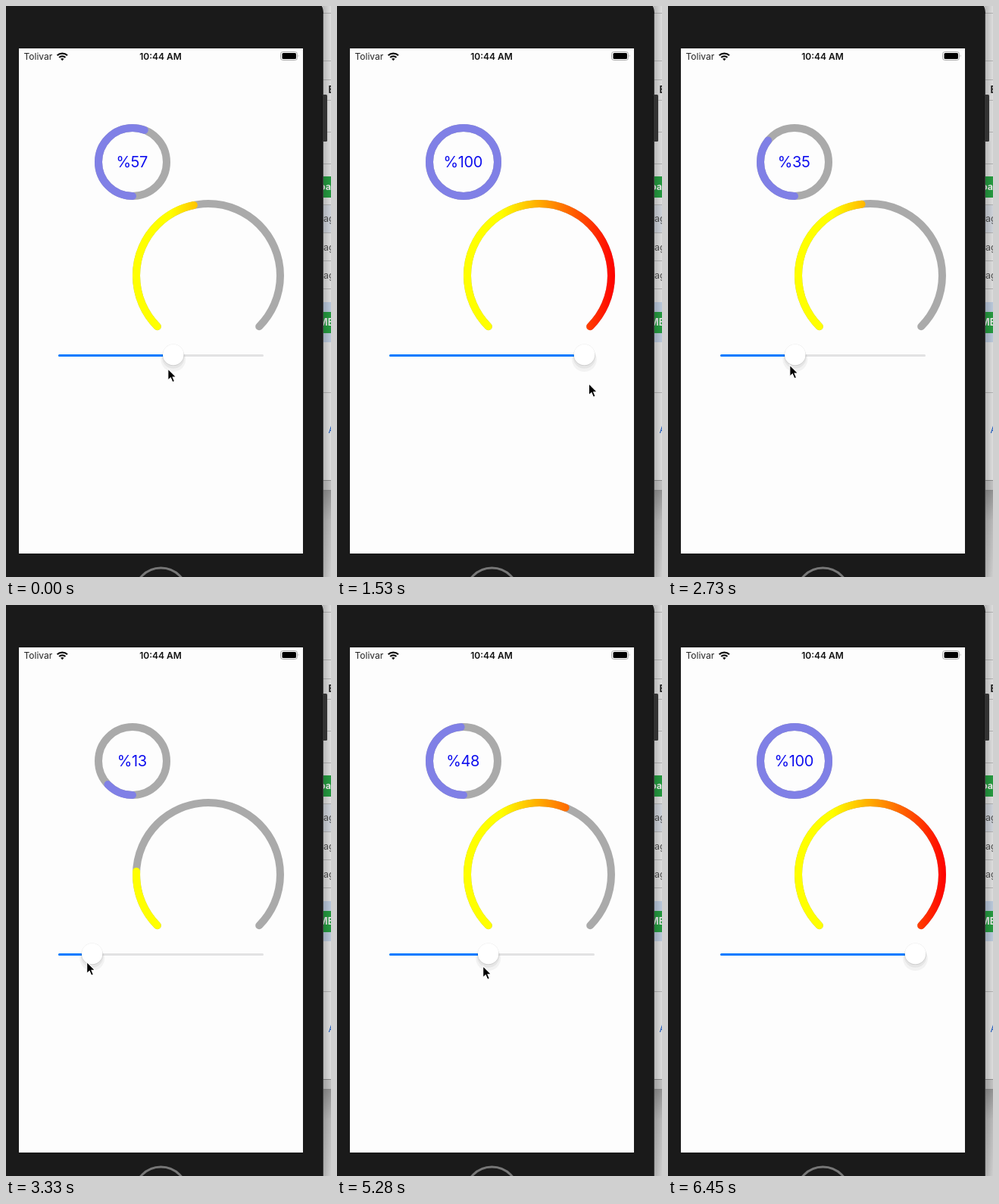
Recreate the animation shown at these times as an HTML page. Size 429 by 754 pixels, loop 6.9 s.

```html
<!DOCTYPE html>
<html lang="en">
<head>
<meta charset="utf-8">
<title>Progress rings</title>
<style>
  html, body { margin: 0; width: 100%; height: 100%; overflow: hidden; background: #1a1a1a; }
  svg { display: block; width: 429px; height: 754px; }
  text { font-family: Inter, Roboto, "Liberation Sans", sans-serif; }
  .ring { fill: none; stroke-width: 10; stroke-linecap: round; }
</style>
</head>
<body>
<svg viewBox="0 0 429 754">
  <defs>
    <linearGradient id="heat" gradientUnits="userSpaceOnUse" x1="217" x2="367" y1="0" y2="0">
      <stop stop-color="#ff0"/>
      <stop offset="1" stop-color="#f00"/>
    </linearGradient>
    <linearGradient id="edge">
      <stop offset="0" stop-color="#000" stop-opacity=".24"/>
      <stop offset="1" stop-color="#000" stop-opacity=".08"/>
    </linearGradient>
    <linearGradient id="floor" x2="0" y2="1">
      <stop offset="0" stop-color="#a0a0a0"/>
      <stop offset=".35" stop-color="#cacaca"/>
      <stop offset="1" stop-color="#e0e0e0"/>
    </linearGradient>
  </defs>

  <!-- window behind the device -->
  <rect x="416" width="13" height="754" fill="#f0f0f0"/>
  <rect x="416" y="262" width="13" height="37" fill="#dfe4ec"/>
  <rect x="416" y="391" width="13" height="53" fill="#c9d9ed"/>
  <g id="rules" stroke="#c2c2c2"></g>
  <g fill="#28a745">
    <rect x="412" y="225" width="20" height="28"/>
    <rect x="412" y="404" width="20" height="28"/>
  </g>
  <g font-size="12.5" fill="#555">
    <text x="425.5" y="115" font-weight="700" fill="#222">E</text>
    <text x="414" y="243" font-weight="700" fill="#fff">oa</text>
    <text x="419" y="285">ag</text>
    <text x="419" y="323">ag</text>
    <text x="419" y="360">ag</text>
    <text x="413" y="422" font-weight="700" fill="#fff">ME</text>
    <text x="425.5" y="564" fill="#1a5fd0">A</text>
  </g>
  <rect x="416" y="626" width="13" height="14" fill="#d2d2d2"/>
  <path d="M416 626.5h13M416 639.5h13" stroke="#999"/>
  <rect x="416" y="640" width="13" height="114" fill="url(#floor)"/>
  <rect x="418" width="11" height="754" fill="url(#edge)"/>

  <!-- device -->
  <path d="M0 0H417Q419 4 419 12V754H0Z" fill="#1a1a1a"/>
  <path d="M418.5 10V754" stroke="#3c3c3c"/>
  <rect x="417" y="117" width="7" height="62" rx="1.5" fill="#333"/>
  <path d="M417.5 118V178" stroke="#111"/>
  <circle cx="204.5" cy="777" r="35" fill="none" stroke="#777" stroke-width="3"/>
  <rect x="17" y="56" width="375" height="667" fill="#fdfdfd"/>

  <!-- status bar -->
  <text x="23.5" y="71" font-size="12" fill="#222">Tolivar</text>
  <text x="204" y="71" font-size="12" font-weight="600" text-anchor="middle" fill="#111">10:44 AM</text>
  <g fill="none" stroke="#111" stroke-width="2.2">
    <path d="M67.6 65.3A9.5 9.5 0 0 1 81 65.3"/>
    <path d="M70.2 68A5.8 5.8 0 0 1 78.4 68"/>
  </g>
  <path d="M72 69.8Q74.3 68 76.6 69.8L74.3 72.2Z" fill="#111"/>
  <rect x="362.5" y="60.5" width="22" height="11" rx="3" fill="none" stroke="#aaa"/>
  <rect x="364.5" y="62" width="18.5" height="8" rx="1.6" fill="#000"/>
  <path d="M385.8 64Q387.4 65.7 385.8 67.5Z" fill="#aaa"/>

  <!-- rings -->
  <circle cx="167" cy="206" r="45" class="ring" stroke="#aaa"/>
  <path id="small" d="M167 251A45 45 0 0 1 167 161A45 45 0 0 1 167 251" pathLength="100" class="ring" stroke="#8080e6"/>
  <text id="label" x="166.2" y="213" font-size="20" letter-spacing="-.4" text-anchor="middle" fill="#0f0fee"></text>
  <path d="M199.8 423.2A95 95 0 1 1 334.2 423.2" class="ring" stroke="#aaa"/>
  <path id="big" d="M199.8 423.2A95 95 0 1 1 334.2 423.2" pathLength="100" class="ring" stroke="url(#heat)"/>

  <!-- slider -->
  <rect x="69" y="460" width="271" height="3" rx="1.5" fill="#e2e2e3"/>
  <rect id="filled" x="69" y="460" height="3" rx="1.5" fill="#007aff"/>
  <g id="thumb">
    <circle cy="466.5" r="16.5" opacity=".045"/>
    <circle cy="464" r="14.8" opacity=".05"/>
    <circle cy="460.8" r="14.3" opacity=".1"/>
    <circle cy="460.5" r="13.8" fill="#fff"/>
  </g>

  <path id="cursor" d="M0 0V15.2L3.5 12L6 17.8L8.7 16.6L6.3 11H11Z" stroke="#fff" stroke-width="1.1"/>
</svg>
<script>
const LOOP = 6900;
const STEP = 150;
const BIG_LAG = 220;
const SMALL_LAG = 20;
const POINTER_GONE = 6200;
const $ = id => document.getElementById(id);

// Where the drag turns or changes pace: [time, percent]; it may run past 100.
const drag = [
  [-220, 45.7], [0, 56.6], [1080, 97.5], [1380, 105.3], [1700, 105.3], [2280, 61],
  [3330, 12.6], [3780, 9.5], [4230, 37.2], [4880, 62], [5480, 43], [6010, 117.5], [6150, 128]
];

const secant = i => (drag[i + 1][1] - drag[i][1]) / (drag[i + 1][0] - drag[i][0]);

// Flat at turning points, otherwise the harmonic mean of both sides.
function slope(i) {
  if (i === 0) return secant(0);
  if (i === drag.length - 1) return secant(i - 1);
  const a = secant(i - 1), b = secant(i);
  return a * b > 0 ? 2 * a * b / (a + b) : 0;
}

function dragAt(t) {
  const next = drag.findIndex(key => key[0] > t);
  if (next < 0) return drag[drag.length - 1][1];
  const i = Math.max(0, next - 1);
  const [t0, v0] = drag[i], [t1, v1] = drag[i + 1];
  const span = t1 - t0, p = (t - t0) / span, q = 1 - p;
  const ease = p * p * (3 - 2 * p);
  return v0 + (v1 - v0) * ease + span * p * q * (q * slope(i) - p * slope(i + 1));
}

const valueAt = t => Math.min(100, dragAt(t));

// The picture refreshes in steps, after a slightly longer first one.
const snap = t => t < 180 ? 0 : 180 + STEP * Math.floor((t - 180) / STEP);

const thumbX = percent => 83 + 2.435 * percent;

function setArc(id, percent) {
  $(id).setAttribute("stroke-dasharray", `${percent} 300`);
}

function moveTo(id, x, y) {
  $(id).setAttribute("transform", `translate(${x} ${y})`);
}

function render(time) {
  const t = snap(time % LOOP);
  const value = valueAt(t);
  const reach = dragAt(t);
  setArc("small", valueAt(t - SMALL_LAG));
  setArc("big", valueAt(t - BIG_LAG));
  $("label").textContent = "%" + Math.round(value);
  $("filled").setAttribute("width", thumbX(value) - 69);
  moveTo("thumb", thumbX(value), 0);
  moveTo("cursor", thumbX(reach) - 7, 471 + 25 * (reach / 100) ** 2);
  $("cursor").style.display = t < POINTER_GONE ? "" : "none";
}

$("rules").innerHTML = [9, 72, 97, 124, 166, 208, 262, 299, 336, 373, 510]
  .map(y => `<path d="M416 ${y + .5}h13"/>`).join("");

const begin = performance.now();
function tick() {
  render(performance.now() - begin);
  requestAnimationFrame(tick);
}
tick();
</script>
</body>
</html>
```
